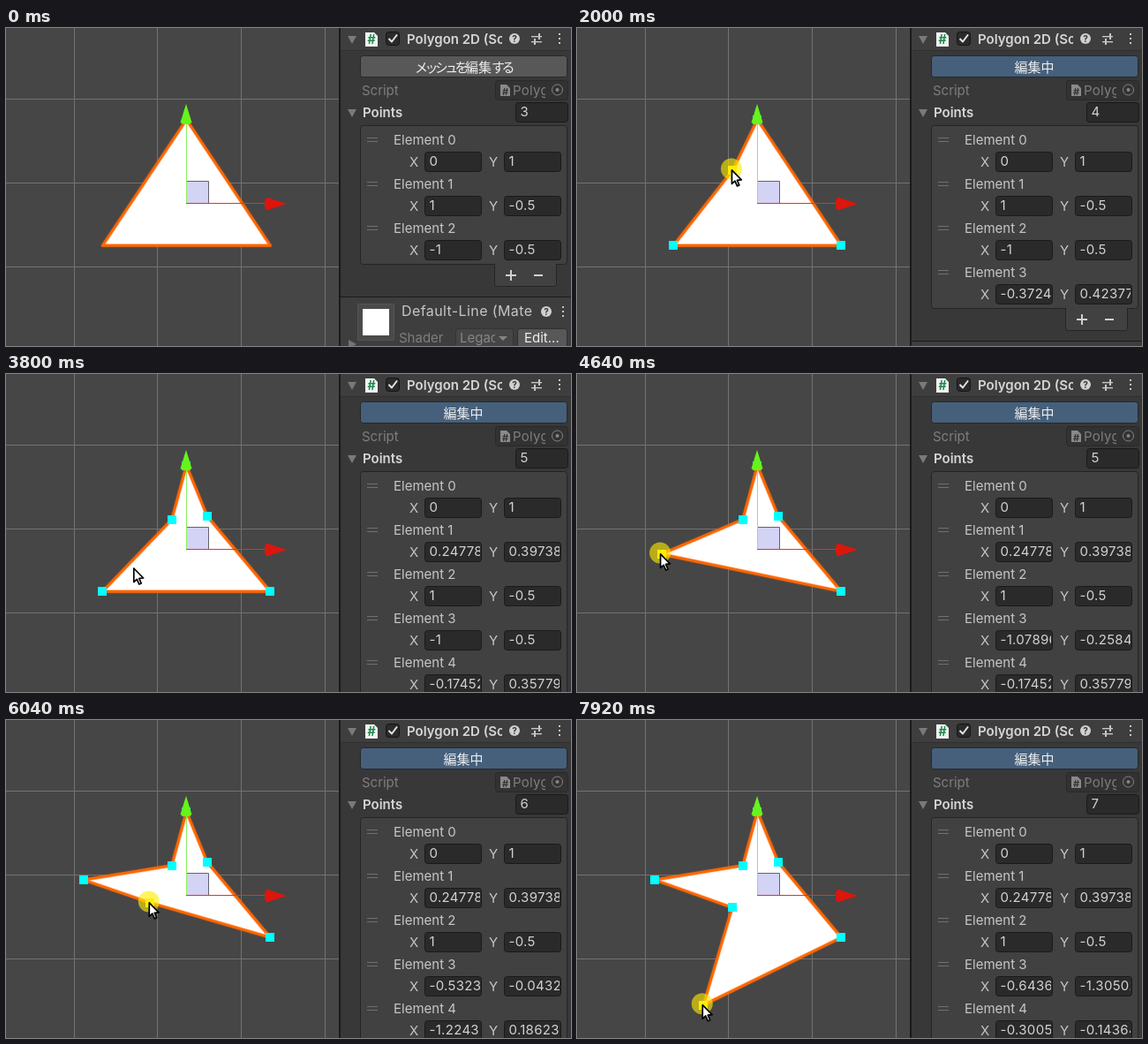
Recreate the animation shown at these times as an HTML page with a canvas. Size 640x360 px, loop 8 s.

```html
<!DOCTYPE html>
<html lang="ja">
<head>
<meta charset="utf-8">
<title>Polygon mesh editor</title>
<style>
html, body { margin: 0; width: 100%; height: 100%; overflow: hidden; background: #383838; }
canvas { display: block; width: 100vw; height: 100vh; }
</style>
</head>
<body>
<canvas id="stage" width="640" height="360"></canvas>
<script>
const ctx = document.getElementById('stage').getContext('2d');
const LOOP = 8000, TICK = 40, PANEL_LAG = 120, HOVER = 200;
const ENTER = 360, PRESS = 840, EDIT = 920;
const LATIN = 'Inter, sans-serif';
const CJK = '"Noto Sans CJK JP", "Noto Sans CJK", sans-serif';
const TEXT = '#c6c6c6', DIM = '#7e7e7e';

// Vertices in outline order, in world units. Inserted ones exist from their grab time on.
const VERTICES = [
  { from: [0, 1] },
  { from: [.36655, .43697], to: [.24778, .39738], inserted: true, grab: 2920, move: [3000, 3160], release: 3320, bow: 72 },
  { from: [1, -.5] },
  { from: [.116, -.26], to: [-.64364, -1.30502], inserted: true, grab: 7240, move: [7240, 7800], release: LOOP },
  { from: [-.6, -.014], to: [-.30052, -.14364], inserted: true, grab: 5680, move: [5760, 6280], release: 6920 },
  { from: [-1, -.5], to: [-1.22432, .18623], grab: 4280, move: [4280, 4880], release: 4960 },
  { from: [-.37243, .42377], to: [-.17452, .35779], inserted: true, grab: 1640, move: [1880, 2160], release: 2320 }
];
const DRAGS = VERTICES.filter(v => v.to).sort((a, b) => a.grab - b.grab);

const toScreen = ([x, y]) => [204.4 + 95 * x, 198.7 - 95 * y];
const mix = (a, b, f) => a.map((v, i) => v + (b[i] - v) * f);

function ease(t, start, end) {
  const f = Math.min(1, Math.max(0, (t - start) / (end - start)));
  return f * f * (3 - 2 * f);
}

const place = (v, t) => v.to ? mix(v.from, v.to, ease(t, ...v.move)) : v.from;
const pointsAt = t => VERTICES.filter(v => !v.inserted || t >= v.grab).map(v => place(v, t));

// The pointer enters, presses the button, then travels from each release to the next grab.
const BUTTON = [473, 40];
const LEGS = [
  { start: ENTER, end: 600, from: [546, 248], to: BUTTON },
  ...DRAGS.map((v, i) => ({
    start: i ? DRAGS[i - 1].release : EDIT,
    end: v.grab - HOVER,
    from: i ? toScreen(DRAGS[i - 1].to) : BUTTON,
    to: toScreen(v.from),
    bow: v.bow
  }))
];

function pointerAt(t) {
  const { start, end, from, to, bow = 0 } = LEGS.findLast(leg => leg.start <= t) || LEGS[0];
  const f = ease(t, start, end);
  const [x, y] = mix(from, to, f);
  return [x, y - bow * Math.sin(Math.PI * f)];
}

function rect(x, y, w, h, color) {
  ctx.fillStyle = color;
  ctx.fillRect(x, y, w, h);
}

function stroke(color, width = 1) {
  ctx.strokeStyle = color;
  ctx.lineWidth = width;
  ctx.stroke();
}

function box(x, y, w, h, fill, border, radius = 3) {
  ctx.beginPath();
  ctx.roundRect(x + .5, y + .5, w - 1, h - 1, radius);
  ctx.fillStyle = fill;
  ctx.fill();
  stroke(border);
}

function shape(points, fill) {
  ctx.beginPath();
  points.forEach(p => ctx.lineTo(...p));
  ctx.closePath();
  ctx.fillStyle = fill;
  ctx.fill();
}

function disc(x, y, r, color) {
  ctx.beginPath();
  ctx.arc(x, y, r, 0, 7);
  ctx.fillStyle = color;
  ctx.fill();
}

// y is the middle of the capitals
function text(str, x, y, { color = TEXT, font = '15px ' + LATIN, right, spacing = 0, align = 'left' } = {}) {
  ctx.save();
  if (right) {
    ctx.beginPath();
    ctx.rect(x - 4, y - 14, right - x + 4, 28);
    ctx.clip();
  }
  ctx.font = font;
  ctx.fillStyle = color;
  ctx.textAlign = align;
  ctx.letterSpacing = spacing + 'px';
  ctx.fillText(str, x, y + 5);
  ctx.restore();
}

function field(x, y, w, value) {
  box(x, y, w, 23, '#2a2a2a', '#1a1a1a');
  text(value, x + 5.5, y + 11, { color: '#d2d2d2', right: x + w - 2, spacing: .3 });
}

const foldout = (x, y) => shape([[x - 5, y - 4], [x + 5, y - 4], [x, y + 5]], '#7a7a7a');

function kebab(x, y) {
  [-5, 0, 5].forEach(d => rect(x - 1, y + d - 1, 2, 2, TEXT));
}

function help(x, y) {
  disc(x, y, 6, '#d0d0d0');
  text('?', x, y - 1, { color: '#333', font: '700 10px ' + LATIN, align: 'center' });
}

function scriptIcon(x, y, w, h, paper, ink, size) {
  shape([[x, y], [x + w - 4, y], [x + w, y + 4], [x + w, y + h], [x, y + h]], paper);
  text('#', x + w / 2, y + h / 2, { color: ink, font: `700 ${size}px ${LATIN}`, align: 'center' });
}

function drawScene(t) {
  rect(0, 0, 378, 360, '#464646');
  for (let i = 0; i < 4; i++) {
    rect(Math.floor(77 + 94.8 * i), 0, 1, 360, '#737373');
    if (i < 3) rect(0, 80 + 95 * i, 378, 1, '#737373');
  }

  const corners = pointsAt(t).map(toScreen);
  ctx.lineJoin = 'round';
  shape(corners, '#fff');
  stroke('rgba(255,102,0,.3)', 4.6);
  stroke('#ff6600', 2.9);

  const held = DRAGS.find(v => t >= v.grab && t < v.release);
  const hovered = DRAGS.find(v => v.inserted && t >= v.grab - HOVER && t < v.grab);
  const grip = held && toScreen(place(held, t));
  const handle = ([x, y], color) => rect(Math.round(x) - 5, Math.round(y) - 5, 10, 10, color);
  if (t >= EDIT) {
    corners.forEach(c => handle(c, '#00ffff'));
    if (hovered) handle(toScreen(hovered.from), '#00ffff');
    if (grip) handle(grip, '#ffee10');
  }
  drawGizmo();
  return { pointer: grip || pointerAt(t), pressed: grip || (t >= PRESS && t < EDIT) };
}

function drawGizmo() {
  box(204, 173, 26, 26, 'rgba(110,110,225,.3)', '#62626f', 0);
  rect(204, 107, 1, 92, '#8cf05c');
  rect(204, 198, 91, 1, '#e8301c');
  shape([[204, 86], [197.5, 107], [201, 109], [207, 109], [210.5, 107]], '#66f51a');
  shape([[318, 199], [295, 191.5], [293, 196], [293, 202], [295, 206.5]], '#dc160c');
}

function drawButton(editing) {
  box(401, 31, 235, 25, editing ? '#46607c' : '#585858', '#282828');
  const font = '15px ' + CJK, color = '#eeeeee';
  if (editing) {
    text('編集中', 518, 44.5, { font, color, align: 'center' });
  } else {
    text('メッシュを', 463, 44.5, { font, color, spacing: -3.6 });
    text('編集', 520, 44.5, { font, color });
    text('する', 550, 44.5, { font, color, spacing: -3.6 });
  }
}

function drawHeader() {
  rect(377, 0, 2, 360, '#1b1b1b');
  rect(379, 0, 261, 360, '#383838');
  rect(379, 0, 261, 25, '#3e3e3e');
  rect(379, 25, 261, 1, '#303030');
  foldout(392, 13);
  scriptIcon(407, 5, 14, 16, '#f2f2f2', '#1e8a4c', 14);
  box(430, 4, 16, 16, '#2a2a2a', '#151515');
  ctx.beginPath();
  [[433.5, 12], [437, 15.5], [443, 7.5]].forEach(p => ctx.lineTo(...p));
  stroke('#e4e4e4', 2);
  text('Polygon 2D (Script)', 454, 13, { color: '#d6d6d6', font: '600 15px ' + LATIN, right: 562 });
  help(576, 12);
  [[9, 603], [15, 598]].forEach(([y, knob]) => {
    rect(595, y, 12, 1.4, TEXT);
    rect(knob, y - 3, 2, 7, TEXT);
  });
  kebab(627, 12);
}

function drawScriptRow() {
  text('Script', 403, 71, { color: DIM });
  box(554, 59, 83, 23, '#323232', '#292929');
  scriptIcon(560, 64, 11, 13, '#898989', '#353535', 11);
  text('Polygon', 574, 71, { color: DIM, right: 611, spacing: .3 });
  ctx.beginPath();
  ctx.arc(624.5, 70, 6, 0, 7);
  stroke('#858585');
  disc(624.5, 70, 2, '#858585');
}

function drawList(points) {
  const bottom = 118 + 50 * points.length;
  const format = v => String(+v.toFixed(6));
  foldout(392, 96);
  text('Points', 404, 96, { color: '#d6d6d6', font: '600 15px ' + LATIN });
  field(577, 84, 60, points.length);
  box(553, bottom - 6, 71, 31, '#414141', '#242424');
  box(401, 110, 235, bottom - 110, '#414141', '#242424');
  rect(554, bottom - 1, 69, 2, '#414141');
  points.forEach((point, i) => {
    const top = 112 + 50 * i;
    [12, 16].forEach(d => rect(409, top + d, 12, 1, '#707070'));
    text('Element ' + i, 439, top + 15);
    point.forEach((value, axis) => {
      const x = 474 + 90 * axis;
      text('XY'[axis], x - 17, top + 40);
      field(x, top + 28, 65, format(value));
    });
  });
  rect(566, bottom + 11, 12, 2, '#d0d0d0');
  rect(571, bottom + 6, 2, 12, '#d0d0d0');
  rect(598, bottom + 11, 10, 2, '#d0d0d0');
}

function drawMaterial(top) {
  if (top > 360) return;
  rect(379, top, 261, 1, '#1b1b1b');
  rect(379, top + 1, 261, 60, '#3e3e3e');
  box(398, top + 8, 42, 42, '#4a4a4a', '#555555', 1);
  rect(404, top + 14, 30, 30, '#fff');
  text('Default-Line (Material)', 448, top + 17, { font: '16px ' + LATIN, right: 596, spacing: .4 });
  help(612, top + 17);
  kebab(631, top + 17);
  shape([[388, top + 49], [397, top + 54], [388, top + 59]], '#737373');
  text('Shader', 445, top + 47, { color: DIM });
  box(509, top + 36, 66, 23, '#464646', '#343434');
  text('Legacy', 514, top + 47, { color: '#858585', right: 554 });
  shape([[558, top + 45], [568, top + 45], [563, top + 50]], '#858585');
  box(579, top + 36, 57, 23, '#585858', '#303030');
  text('Edit...', 587, top + 47, { color: '#eeeeee' });
}

function drawPointer([x, y], pressed) {
  if (pressed) disc(x - 1.5, y - 1.5, 12, 'rgba(255,235,0,.62)');
  const outline = [[0, 0], [0, 15.5], [3.5, 12.3], [6, 18], [8.4, 17], [6, 11.4], [10.8, 11]];
  shape(outline.map(([dx, dy]) => [x - 1 + dx, y + dy]), '#fff');
  stroke('#000', 1.7);
}

function draw(now) {
  const t = Math.floor(now % LOOP / TICK) * TICK;
  const { pointer, pressed } = drawScene(t);
  const listed = pointsAt(t - PANEL_LAG);
  drawHeader();
  drawButton(t >= EDIT);
  drawScriptRow();
  drawMaterial(154 + 50 * listed.length);
  drawList(listed);
  if (t >= ENTER) drawPointer(pointer, pressed);
}

const began = performance.now();
function play() {
  draw(Math.max(0, performance.now() - began));
  requestAnimationFrame(play);
}
play();
</script>
</body>
</html>
```
